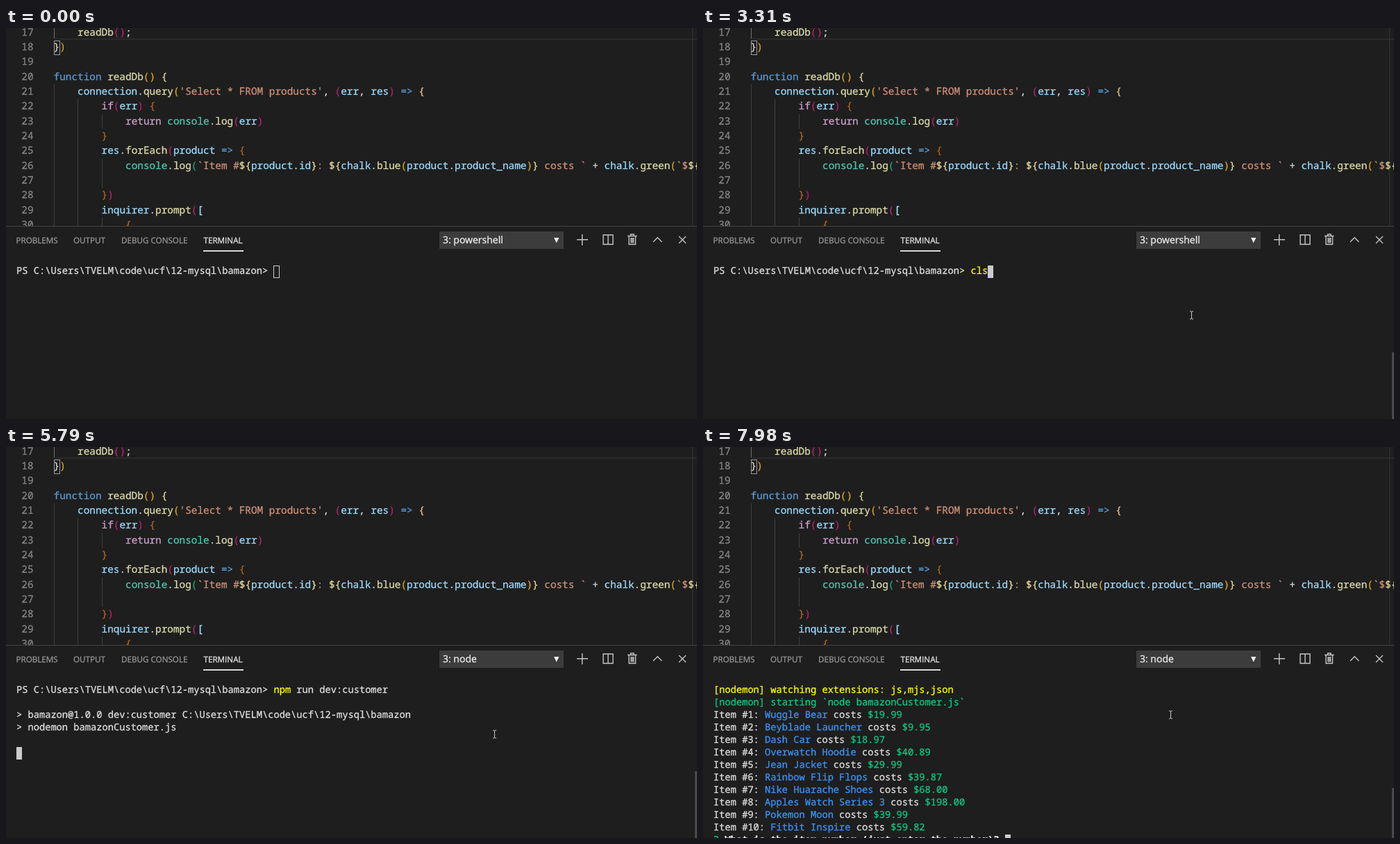
Recreate the animation shown at these times as an HTML page. Size 995 by 563 pixels, loop 8 s.

```html
<!DOCTYPE html>
<html lang="en">
<head>
<meta charset="utf-8">
<title>Terminal session</title>
<style>
html, body { margin: 0; width: 100%; height: 100%; overflow: hidden; background: #1e1e1e; }
#stage { position: relative; width: 995px; height: 563px; overflow: hidden; background: #1e1e1e;
  text-rendering: geometricPrecision; -webkit-text-stroke: .3px; }
#stage div, svg { position: absolute; }
#editor { left: 0; top: 0; width: 995px; height: 285px; overflow: hidden;
  font: 14.37px/21.33px "Noto Sans Mono", monospace; }
#panel { left: 0; top: 285px; width: 995px; height: 1px; background: #444; }
#term { left: 0; top: 0; width: 995px; height: 563px; font: 13.72px/18px "Noto Sans Mono", monospace; }
.row { white-space: pre; }
.num { left: 0; width: 39.5px; text-align: right; color: #858585; }
.guide { width: 1px; background: #404040; }
.tab { top: 298.5px; font: 11.65px/16px "Open Sans", sans-serif; color: #979797; white-space: pre; }
.tab.on { color: #e7e7e7; }
#line { left: 284px; top: 320px; width: 58px; height: 2px; background: #d8d8d8; }
#select { left: 624px; top: 293px; width: 174px; height: 25px; padding-left: 5px; background: #3c3c3c;
  color: #f0f0f0; font: 14px/26px "Open Sans", sans-serif; }
#caret { box-sizing: border-box; width: 8.3px; height: 18px; border: 1px solid #ccc; }
#bar { left: 992px; width: 3px; background: #4b4b4b; }
svg { left: 0; top: 0; fill: none; }
</style>
</head>
<body>
<div id="stage">
  <div id="editor"></div>
  <div id="panel"></div>
  <div class="tab" style="left:14.5px">PROBLEMS</div>
  <div class="tab" style="left:97px">OUTPUT</div>
  <div class="tab" style="left:166px">DEBUG CONSOLE</div>
  <div class="tab on" style="left:284.5px">TERMINAL</div>
  <div id="line"></div>
  <div id="select"></div>
  <div id="term"></div>
  <div id="caret"></div>
  <div id="bar"></div>
  <svg width="995" height="563">
    <path d="M789 302h7.4l-3.7 7.6z" fill="#f0f0f0"/>
    <g stroke="#c5c5c5" stroke-width="1.4">
      <path d="M829.7 297v16M822 304.7h16"/>
      <path d="M860 298h14v13.5h-14zM867 298v13.5"/>
      <path d="M895 299.5h13.5M899.5 299v-2h4.5v2M897 300v11.5h9.5v-11.5M900 302v7.5M901.8 302v7.5M903.6 302v7.5"/>
      <path d="M932 308l6.2-6.2 6.2 6.2"/>
      <path d="M969 300l10 10M979 300l-10 10"/>
    </g>
    <path id="mouse" d="M-2.5 -5.5h2l.5 .5 .5 -.5h2M0 -5v10M-2.5 5.5h2l.5 -.5 .5 .5h2" stroke="#c8c8c8"/>
  </svg>
</div>
<script>
const $ = id => document.getElementById(id);
const LOOP = 8000;

const colors = {
  w: '#d4d4d4', k: '#569cd6', f: '#dcdcaa', v: '#9cdcfe', s: '#ce9178', c: '#d0a0cc', t: '#4ec9b0',
  1: '#d9a520', 2: '#b5246f', 3: '#1f9d84',
  a: '#e8dc9a', b: '#e2c08d', o: '#b0651d',
  n: '#e0e0e0', y: '#ffff10', g: '#0fc982', u: '#3b94fa', W: '#f4f4f4'
};

function add(parent, cls, style) {
  const el = document.createElement('div');
  el.className = cls;
  for (const key in style) {
    const val = style[key];
    el.style[key] = typeof val === 'number' ? val + 'px' : val;
  }
  parent.append(el);
  return el;
}

// tokens: colour key and text by turns
function addRow(parent, left, top, tokens) {
  const row = add(parent, 'row', { left, top });
  for (let i = 0; i < tokens.length; i += 2) {
    const span = document.createElement('span');
    span.style.color = colors[tokens[i]];
    if (tokens[i] === 'W') span.style.fontWeight = 'bold';
    span.textContent = tokens[i + 1];
    row.append(span);
  }
}

// ---- editor ----
const code = [
  [4, 'f', 'readDb', 2, '()', 'w', ';'],
  [0, 'w', '}', 1, ')'],
  [0],
  [0, 'k', 'function ', 'f', 'readDb', 1, '()', 'a', ' {'],
  [4, 'v', 'connection', 'w', '.', 'f', 'query', 1, '(', 's', "'Select * FROM products'", 'w', ', ',
    2, '(', 'v', 'err', 'w', ', ', 'v', 'res', 2, ')', 'k', ' => ', 'b', '{'],
  [8, 'c', 'if', 2, '(', 'v', 'err', 2, ')', 'o', ' {'],
  [12, 'c', 'return ', 't', 'console', 'w', '.', 'f', 'log', 2, '(', 'v', 'err', 2, ')'],
  [8, 'o', '}'],
  [8, 'v', 'res', 'w', '.', 'f', 'forEach', 2, '(', 'v', 'product', 'k', ' => ', 'o', '{'],
  [12, 't', 'console', 'w', '.', 'f', 'log', 3, '(', 's', '`Item #', 'a', '${', 'v', 'product', 'w', '.',
    'v', 'id', 'a', '}', 's', ': ', 'a', '${', 'v', 'chalk', 'w', '.', 'f', 'blue', 1, '(', 'v', 'product',
    'w', '.', 'v', 'product_name', 1, ')', 'a', '}', 's', ' costs `', 'w', ' + ', 'v', 'chalk', 'w', '.',
    'f', 'green', 1, '(', 's', '`$', 'a', '${'],
  [0],
  [8, 'o', '}', 2, ')'],
  [8, 'v', 'inquirer', 'w', '.', 'f', 'prompt', 2, '(', 'v', '['],
  [12, 'o', '{']
];
const editor = $('editor'), LINE = 21.33;
const lineTop = n => (n - 17) * LINE - 4.3;

function guide(col, from, to, background = '#404040') {
  add(editor, 'guide', {
    left: Math.round(68.6 + col * 8.62), top: lineTop(from), height: (to - from + 1) * LINE, background
  });
}
guide(0, 17, 17, '#707070');
guide(0, 21, 30);
guide(4, 22, 30);
guide(8, 23, 23);
guide(8, 26, 27);
guide(8, 30, 30);
add(editor, '', { left: 69, top: 15, width: 926, height: 2, background: '#2a2a2a' });
add(editor, '', { left: 988, top: 0, width: 1, height: 285, background: '#343434' });
add(editor, '', { left: 69, top: 18, width: 7, height: 19, border: '1px solid #999' });
code.forEach(([col, ...tokens], i) => {
  const top = lineTop(17 + i);
  add(editor, 'num', { top }).textContent = 17 + i;
  addRow(editor, 68.6 + col * 8.62, top, tokens);
});

// ---- terminal ----
const dir = 'C:\\Users\\TVELM\\code\\ucf\\12-mysql\\bamazon';
const prompt = ['n', `PS ${dir}> `];
const cls = [...prompt, 'y', 'cls'];
const npm = [...prompt, 'y', 'npm', 'n', ' run dev:customer'];
const log = (text, color = 'y') => [color, '[nodemon] ' + text];
const header = [npm, [], ['n', `> bamazon@1.0.0 dev:customer ${dir}`], ['n', '> nodemon bamazonCustomer.js'], []];
const info = [
  log('2.0.1'),
  log('to restart at any time, enter `rs`'),
  log('watching dir(s): *.*'),
  log('watching extensions: js,mjs,json')
];
const start = log('starting `node bamazonCustomer.js`', 'g');
const items = [
  ['Wuggle Bear', '19.99'], ['Beyblade Launcher', '9.95'], ['Dash Car', '18.97'],
  ['Overwatch Hoodie', '40.89'], ['Jean Jacket', '29.99'], ['Rainbow Flip Flops', '39.87'],
  ['Nike Huarache Shoes', '68.00'], ['Apples Watch Series 3', '198.00'],
  ['Pokemon Moon', '39.99'], ['Fitbit Inspire', '59.82']
].map(([name, price], i) => ['n', `Item #${i + 1}: `, 'u', name, 'n', ' costs ', 'g', '$' + price]);
const question = ['g', '? ', 'W', 'What is the item number (just enter the number)? '];

// time, rows; the caret stands at the end of the last row
const screens = [
  [0, [prompt]],
  [3310, [cls]],
  [3630, [prompt]],
  [4320, [cls]],
  [4550, [npm]],
  [5030, [npm, []]],
  [5790, [...header, []]],
  [5960, [...header, ...info, []]],
  [6030, [...header, ...info, start, []]],
  [6430, [info[3], start, ...items, question]]
];

// time, x, y
const moves = [
  [0, -20, -20],
  [210, 900, 520], [290, 800, 455], [360, 735, 425], [430, 708, 414], [510, 702, 411],
  [2240, 702, 410], [2390, 709, 415], [2470, 703, 413],
  [7820, 700, 410], [7900, 688, 398], [7980, 673, 385]
];

const at = (table, t) => table.findLast(step => step[0] <= t);
let shown;

function drawScreen(rows) {
  const term = $('term');
  term.textContent = '';
  rows.forEach((tokens, i) => addRow(term, 15, 340.7 + 18 * i, tokens));
  const last = rows.length - 1;
  const chars = rows[last].filter((_, i) => i % 2).join('').length;
  $('caret').style.left = 15 + chars * 8.233 + 'px';
  $('caret').style.top = 342 + 18 * last + 'px';
}

function frame() {
  const t = performance.now() % LOOP;
  const rows = at(screens, t)[1];
  if (rows !== shown) drawScreen(shown = rows);
  $('caret').style.background = t < 2470 ? 'none' : '#ccc';
  $('select').textContent = t < 5100 ? '3: powershell' : '3: node';
  const [, x, y] = at(moves, t);
  $('mouse').setAttribute('transform', `translate(${x + .5} ${y + .5})`);
  const bar = $('bar').style, top = t < 6430 ? 467 : 491;
  bar.top = top + 'px';
  bar.height = 563 - top + 'px';
  bar.opacity = Math.min(1, Math.max(0, (t - 210) / 200));
  requestAnimationFrame(frame);
}
frame();
</script>
</body>
</html>
```
